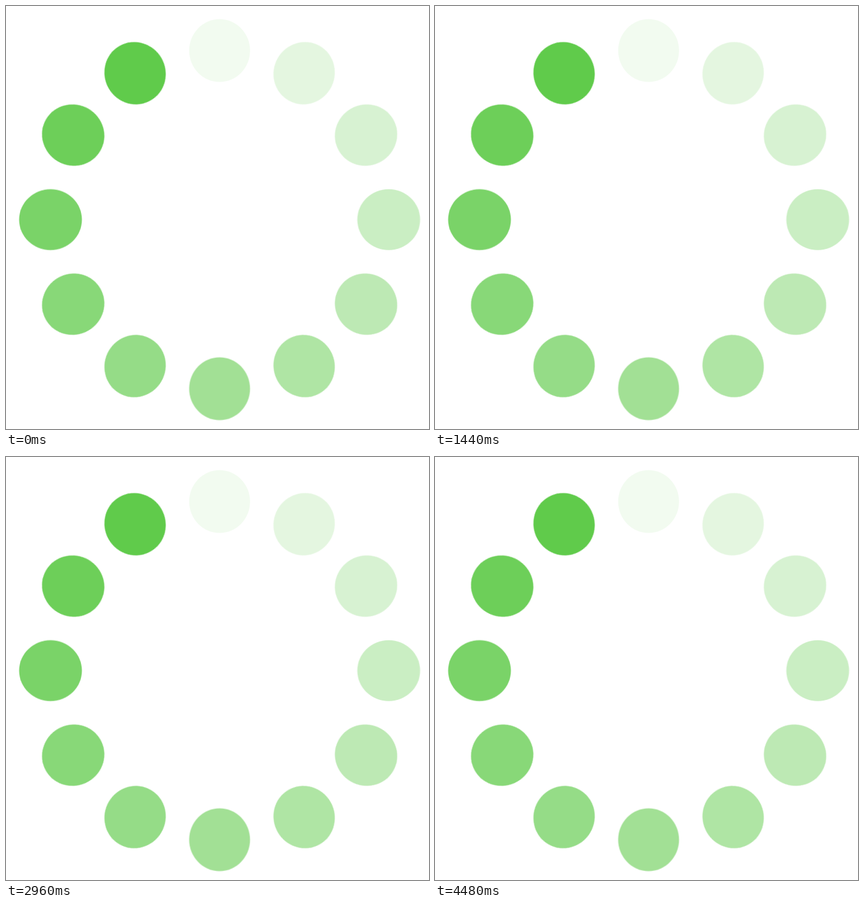
Recreate the animation shown at these times as an HTML page. Size 660x660 px, loop 4.56 s.

```html
<!DOCTYPE html>
<html lang="en">
<head>
<meta charset="utf-8">
<title>Spinner</title>
<style>
  html, body {
    margin: 0;
    width: 100%;
    height: 100%;
    overflow: hidden;
    background: #fff;
  }
  svg { display: block; }
  #ring {
    fill: #60cb4b;
    transform-origin: 333px 333px;
    animation: spin 1520ms infinite;
  }
  /* Twelve hard 120 ms steps; the rest pose lasts 200 ms across the seam. */
  @keyframes spin {
    0% { transform: rotate(0deg); animation-timing-function: step-end; }
    7.89% { transform: rotate(30deg); animation-timing-function: steps(11, end); }
    94.73%, 100% { transform: rotate(360deg); }
  }
</style>
</head>
<body>
<svg width="660" height="660" viewBox="0 0 660 660">
  <g id="ring"></g>
</svg>
<script>
  const COUNT = 12;
  const CENTER = { x: 333.3, y: 333.35 };
  const RADIUS = 263.8;
  const ring = document.getElementById("ring");

  function addDot(i) {
    const dot = document.createElementNS("http://www.w3.org/2000/svg", "ellipse");
    const attrs = {
      cx: CENTER.x,
      cy: CENTER.y - RADIUS,
      rx: 47.5,
      ry: 49,
      "fill-opacity": (i + 1) / COUNT,
      transform: `rotate(${i * 360 / COUNT} ${CENTER.x} ${CENTER.y})`
    };
    for (const [name, value] of Object.entries(attrs)) dot.setAttribute(name, value);
    ring.append(dot);
  }

  for (let i = 0; i < COUNT; i++) addDot(i);
</script>
</body>
</html>
```
